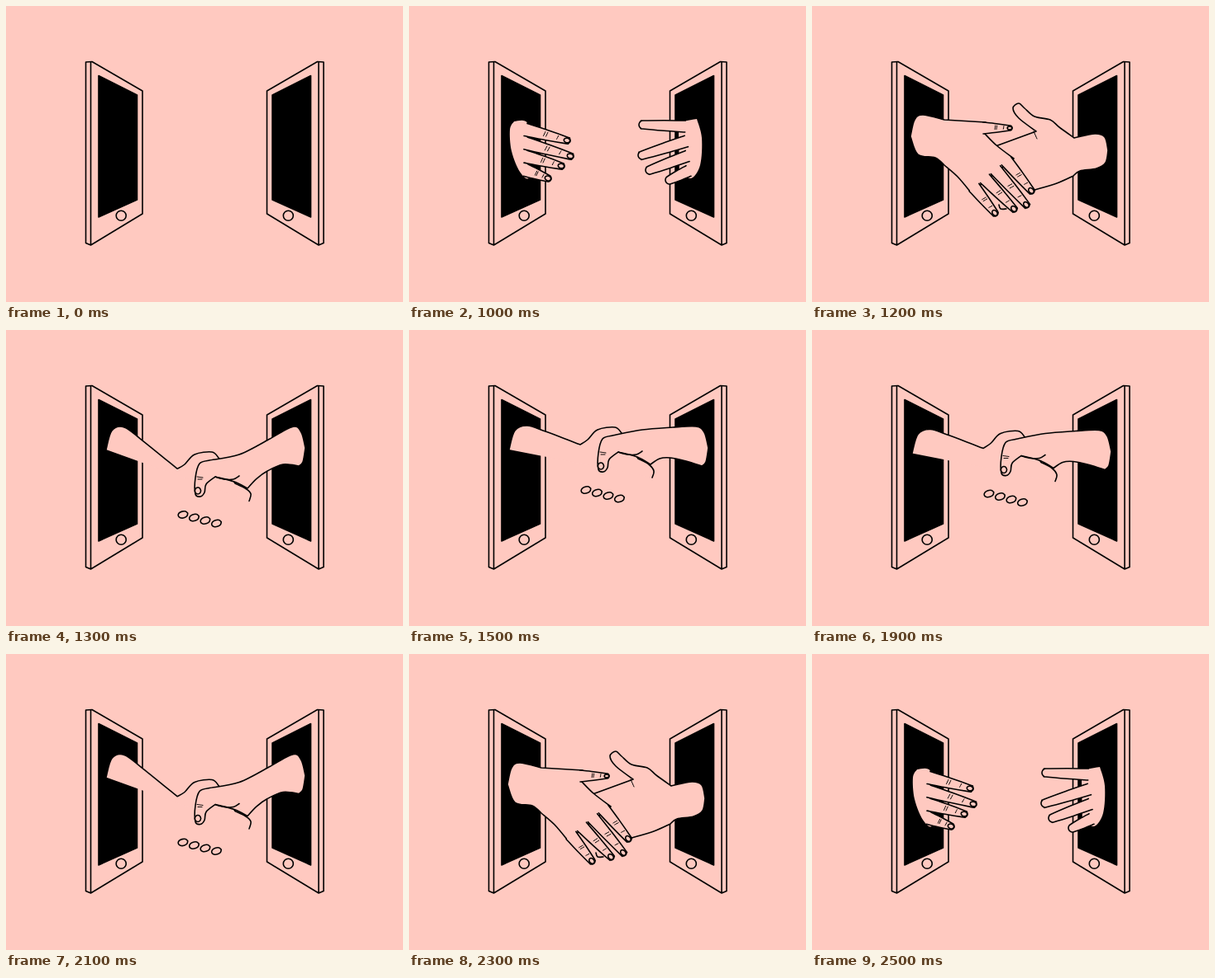
Animation of 480 by 359 pixels, one loop 2600 ms. Source, as an HTML page:

```html
<!DOCTYPE html>
<html lang="en">
<head>
<meta charset="utf-8">
<title>Handshake</title>
<style>
  html, body { margin: 0; width: 100%; height: 100%; overflow: hidden; background: #ffc9c0; }
  svg { display: block; width: 100%; height: 100%; }
  path, circle { stroke: #000; stroke-width: 1.6; stroke-linecap: round; stroke-linejoin: round; }
  .line { fill: none; }
  .skin, .palm { fill: #ffc9c0; }
  .palm { stroke: none; }
  .detail { fill: none; stroke-width: 1; }
</style>
</head>
<body>
<svg viewBox="0 0 480 359" preserveAspectRatio="none">
  <defs>
    <g id="phone">
      <path class="line" d="M96.5,68 L104,67.5 L165,103 V252 L102.5,290 L96.5,287.5 Z M102.5,69 V289"/>
      <path d="M112,84.5 L158.5,108 V235 L112,256 Z"/>
      <circle class="line" cx="139.2" cy="254.2" r="6"/>
    </g>
  </defs>
  <use href="#phone"/>
  <use href="#phone" transform="translate(480.5) scale(-1 1)"/>
  <g id="hands"></g>
</svg>
<script>
const LOOP = 2600, OPEN = 1000, STEP = 100;
const hands = document.getElementById('hands');

const mix = (a, b, t) => a.map((v, k) => v + (b[k] - v) * t);
const range = n => [...Array(n).keys()];

// "x,y x,y / x,y" becomes a list of curves; a slash marks a sharp corner.
const parse = text => text.split('/').map(part => part.trim().split(/\s+/).map(p => p.split(',').map(Number)));
const shape = kind => (...parts) => ({ kind, curves: parts.flatMap(p => typeof p === 'string' ? parse(p) : p) });
const [skin, palm, line, detail] = ['skin', 'palm', 'line', 'detail'].map(shape);

// Catmull-Rom curves, each one starting where the last one ended
function spline(curves, warp) {
  let d = '', last;
  for (const curve of curves) {
    const pts = curve.map(p => warp(...p));
    if (last) pts.unshift(last);
    else d = 'M' + pts[0];
    for (let i = 0; i < pts.length - 1; i++) {
      const a = pts[i - 1] || pts[i], b = pts[i], c = pts[i + 1], e = pts[i + 2] || c;
      const out = b.map((v, k) => v + (c[k] - a[k]) / 6);
      const back = c.map((v, k) => v - (e[k] - b[k]) / 6);
      d += `C${out} ${back} ${c}`;
    }
    last = pts.at(-1);
  }
  return d;
}

function oval([x, y], rx, ry, tilt) {
  const cos = Math.cos(tilt), sin = Math.sin(tilt);
  return skin([range(9).map(i => {
    const u = rx * Math.cos(i * Math.PI / 4), v = ry * Math.sin(i * Math.PI / 4);
    return [x + u * cos - v * sin, y + u * sin + v * cos];
  })]);
}

// A tapered finger, open at its base; "marked" adds creases and a nail.
function finger(base, tip, width, tipWidth, marked) {
  const angle = Math.atan2(tip[1] - base[1], tip[0] - base[0]);
  const cos = Math.cos(angle), sin = Math.sin(angle);
  const at = (t, side) => {
    const [x, y] = mix(base, tip, t), w = side * (width + (tipWidth - width) * t) / 2;
    return [x - sin * w, y + cos * w];
  };
  const r = tipWidth / 2;
  const round = range(7).map(i => {
    const a = angle - Math.PI / 2 + i * Math.PI / 6;
    return [tip[0] + r * Math.cos(a), tip[1] + r * Math.sin(a)];
  });
  const outline = skin([[at(0, -1), at(.5, -1.05), ...round, at(.5, 1.05), at(0, 1)]]);
  if (!marked) return [outline];
  const creases = [.46, .52, .78].map(t => detail([[at(t, -.6), at(t - .02, .3)]]));
  return [outline, ...creases, oval(tip, r * .95, r * .7, angle)];
}

// Fingers with evenly spaced bases, the lowest one drawn first
const fingers = (first, final, tips, width, tipWidth, marked) => parse(tips)[0]
  .map((tip, i, all) => finger(mix(first, final, i / (all.length - 1)), tip, width, tipWidth, marked))
  .reverse().flat();

// A row of knuckles bulging out from the line a-b
const knuckles = (a, b, count, bulge) => range(count).map(i => {
  const [x, y] = mix(a, b, (i + .5) / count);
  const dx = b[0] - a[0], dy = b[1] - a[1], len = Math.hypot(dx, dy);
  return [[x + dy / len * bulge, y - dx / len * bulge], mix(a, b, (i + 1) / count)];
});

const reach = [
  palm('127,140 143,142 146,175 145,208 134,201 124,176 122,150 127,140'),
  ...fingers([141, 150], [141, 199], '191,163 195,182 184,194 168,209', 15.5, 8, true),
  palm('348,137 330,140 / 326,153 / 327,200 / 341,209 352,193 354,160 348,137'),
  ...fingers([334, 146], [338, 200], '283,144 282,181 291,199 315,211', 14, 10)
];

const meet = [
  skin('358,175 354,159 342,155 317,160 / 299,147 288,138 269,134 257,124 250,118 243,124 250,136 271,152 / ' +
    '222,170 / 269,223 / 296,215 316,206 / 324,200 344,197 355,190 358,175'),
  detail('268,152 272,161'),
  line('226,241 228,246 235,246'),
  skin('119,158 124,138 134,132 160,138 / 210,141 / 209,155 / 223,169 244,185 / 192,226 / ' +
    '176,207 160,193 / 149,184 128,180 119,158'),
  ...finger([207, 148], [239, 148], 14, 6, true),
  ...fingers([235, 188], [196, 220], '265,224 259,241 244,246 221,251', 15, 8, true)
];

const clasp = [
  skin('121,145 128,122 143,116 165,123 207,139 / 216,133 228,121 249,118 257,125 / 277,156 / 290,163 296,171 294,179 / ',
    knuckles([294, 179], [252, 207], 4, -2.5),
    '222,197 205,187 187,176 165,168 / 142,164 125,162 121,145'),
  ...range(4).map(i => oval([214 + 13.5 * i, 194 + 3.5 * i], 6, 4, -.3)),
  skin('246,128 282,121 319,118 / 347,117 357,124 362,143 / 359,160 354,165 / 335,159 316,155 303,156 292,163 / ' +
    '276,154 253,148 / 242,157 240,167 235,172 229,169 229,149 234,132 246,128'),
  oval([232, 165], 3.6, 4, 0),
  detail('231,148 238,149'),
  detail('232,151 237,151'),
  line('253,148 264,151 275,151 282,147')
];

const still = (x, y) => [x, y];

// Draws both arms back towards their screens.
const retract = (x, y) => [x < 240 ? mix([x], [120], .2)[0] : mix([x], [358], .2)[0], y];

// Moves the grip down while the far ends of the arms stay in the screens.
const shake = (shift, drop) => (x, y) => {
  const t = Math.max(0, Math.min(1, (x - 130) / 85, (350 - x) / 65));
  return [x, y + shift + drop * t * t * (3 - 2 * t)];
};

// The hands come out and go back through the same poses.
function pose(step) {
  const steps = (LOOP - OPEN) / STEP;
  const depth = Math.min(step, steps - 1 - step);
  if (depth < 0) return [[], still];
  if (depth === 0) return [reach, still];
  if (depth < 3) return [meet, depth === 1 ? retract : still];
  const beat = Math.floor((step - 3) / 2);
  return [clasp, shake(beat > 1 ? 4.5 : 0, beat % 2 ? 0 : 30)];
}

let shown;
function draw(time) {
  const step = Math.floor((time - OPEN) / STEP);
  if (step === shown) return;
  shown = step;
  const [shapes, warp] = pose(step);
  hands.innerHTML = shapes.map(({ kind, curves }) => `<path class="${kind}" d="${spline(curves, warp)}"/>`).join('');
}

const begin = performance.now();
function animate(now) {
  draw(Math.max(0, now - begin) % LOOP);
  requestAnimationFrame(animate);
}
draw(0);
requestAnimationFrame(animate);
</script>
</body>
</html>
```
